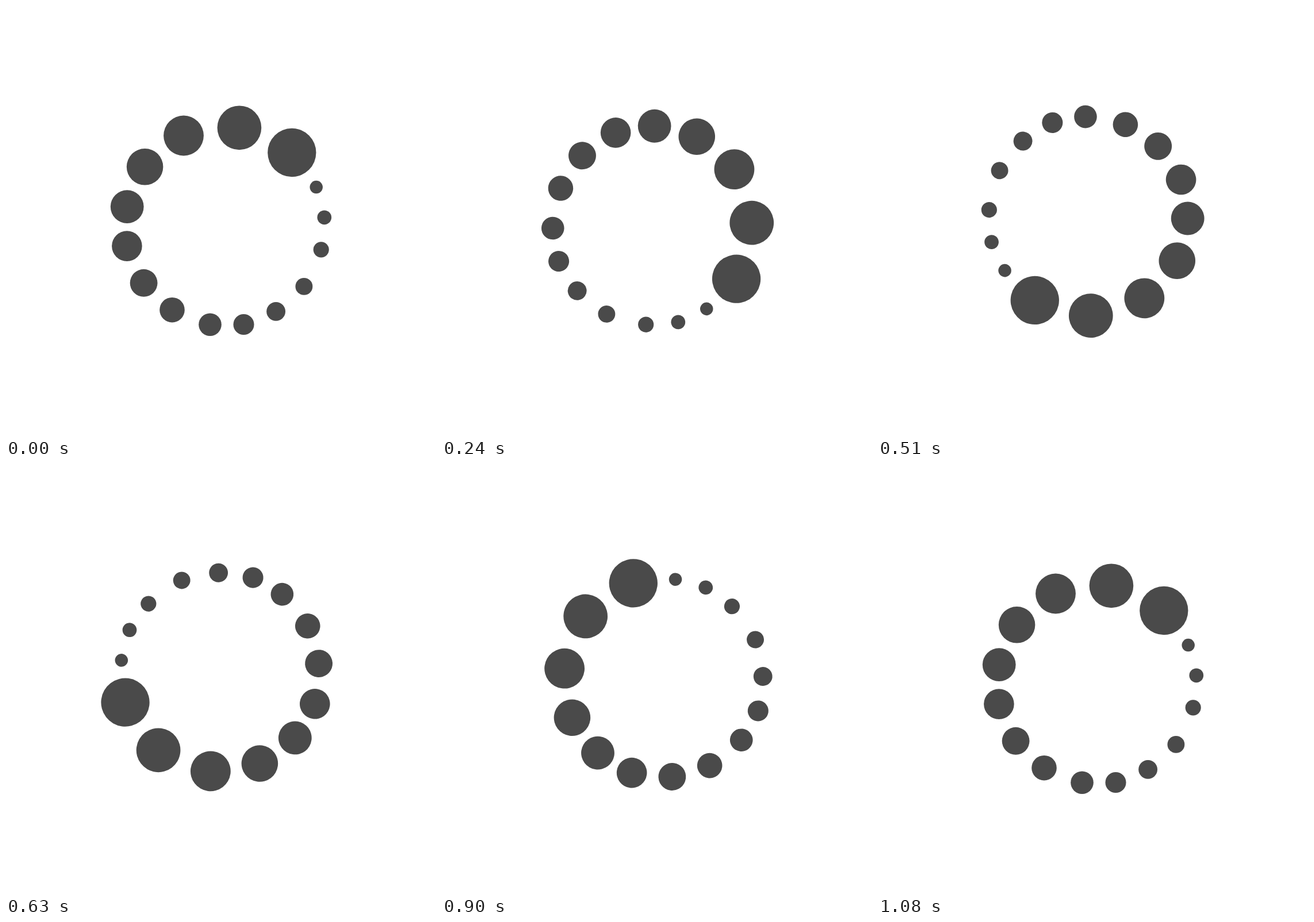
Recreate the animation shown at these times as an HTML page. Size 748 by 748 pixels, loop 1.11 s.

```html
<!DOCTYPE html>
<html lang="en">
<head>
<meta charset="utf-8">
<title>Spinner</title>
<style>
  html, body { margin: 0; height: 100%; overflow: hidden; background: #fff; }
  svg { display: block; width: 100vw; height: 100vh; }
</style>
</head>
<body>
<svg viewBox="0 0 748 748"><g id="ring" fill="#4a4a4a"></g></svg>
<script>
  const CENTER = [373.8, 373.65];
  const LOOP = 1110, TICK = 30, STEP = 10;
  const ring = document.getElementById('ring');

  // Dot centers, largest first; each radius is 91% of the one before.
  const dots = [
    [497.3, 255], [405.9, 211.8], [309, 225.5], [241.6, 279.8], [210.7, 349.1],
    [210.4, 417.6], [239.6, 481.8], [289, 528.7], [355, 554.2], [413.5, 554],
    [469.6, 531.3], [518.4, 487.9], [548.2, 423.8], [553.8, 367.8], [539.7, 315.1]
  ];
  ring.innerHTML = dots.map(([x, y], i) =>
    `<circle cx="${x}" cy="${y}" r="${42.15 * 0.91 ** i}"/>`).join('');

  const start = performance.now();

  function draw() {
    const t = (performance.now() - start) % LOOP;
    const angle = Math.floor(t / TICK) * STEP;
    ring.setAttribute('transform', `rotate(${angle} ${CENTER})`);
    requestAnimationFrame(draw);
  }
  draw();
</script>
</body>
</html>
```
